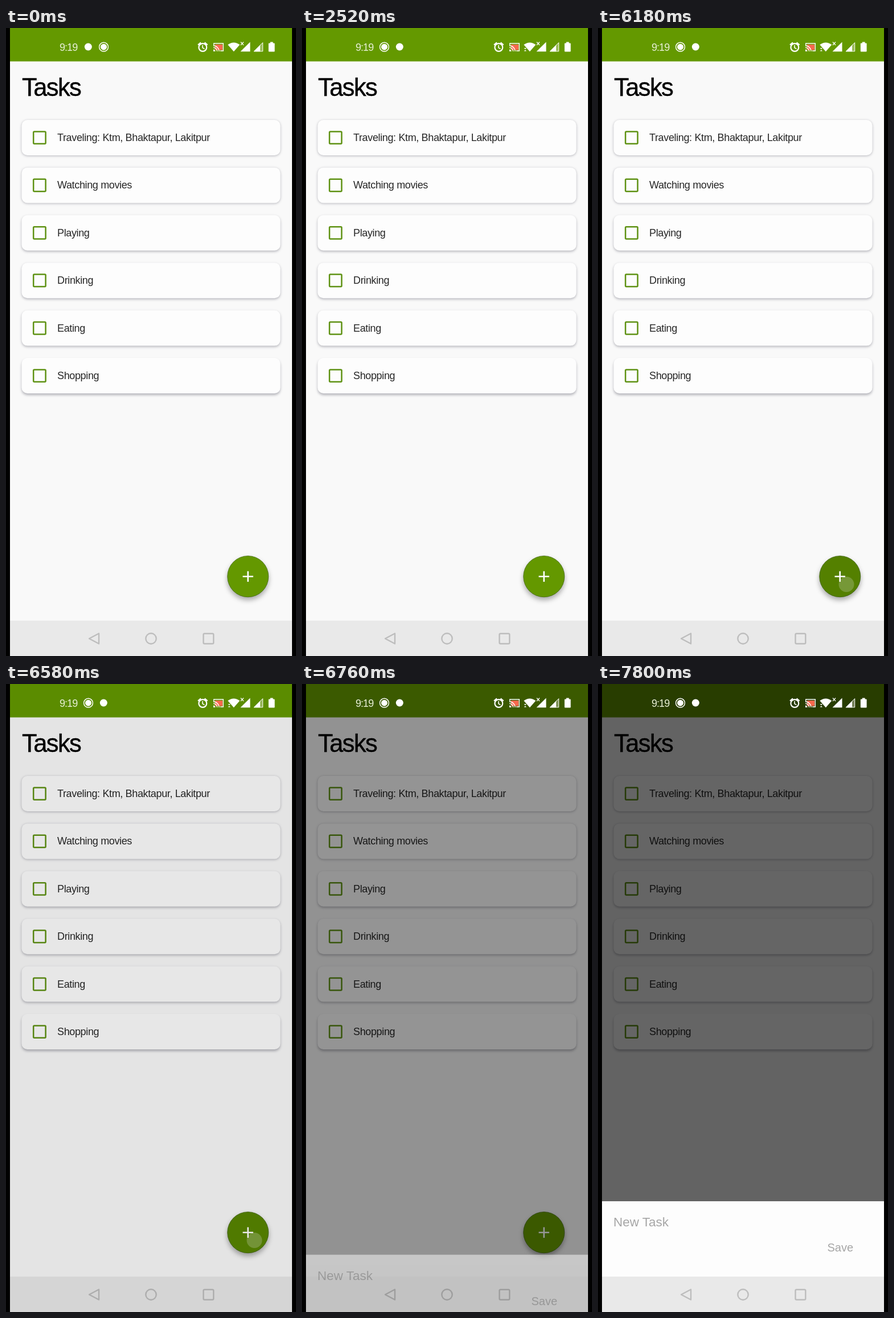
These frames come from a looping animation (509 px wide and 1100 px high, 8000 ms). An HTML page:

```html
<!DOCTYPE html>
<html lang="en">
<head>
<meta charset="utf-8">
<title>Tasks</title>
<style>
  html, body { margin: 0; width: 100%; height: 100%; overflow: hidden; background: #000; }
  svg { display: block; width: 100%; height: 100%; font-family: "Liberation Sans", Arial, sans-serif; }
  .title { font-size: 43.5px; letter-spacing: -1.6px; stroke: #000; stroke-width: .4; }
  .label { font-size: 18px; letter-spacing: -.36px; fill: #262626; }
  .card { fill: #fdfdfd; }
  .box { fill: none; stroke: #5f9214; stroke-width: 2.5; }
  .fab { fill: #649800; stroke: #41690c; stroke-width: .8; filter: drop-shadow(.5px 5px 4px rgba(0, 0, 0, .32)); }
  .hint { fill: #a6a6a6; }
  .nav { fill: none; stroke: #000; stroke-opacity: .19; stroke-width: 2.4; stroke-linejoin: round; }
</style>
</head>
<body>
<svg viewBox="0 0 509 1100" xmlns="http://www.w3.org/2000/svg">
  <defs><clipPath id="screen"><rect x="7" width="495" height="1100"/></clipPath></defs>
  <rect width="509" height="1100"/>
  <g clip-path="url(#screen)">
    <rect x="7" width="495" height="1100" fill="#f9f9f9"/>
    <rect x="7" width="495" height="58.5" fill="#649900"/>
    <text class="title" x="28" y="118.5">Tasks</text>
    <g id="list"></g>
    <rect x="7" y="1038" width="495" height="62" fill="#e9e9e9"/>

    <circle class="fab" cx="424.7" cy="960.7" r="36"/>
    <circle id="ripple" cx="424.7" cy="960.7" r="36" opacity="0"/>
    <path d="M415.5 960.7h18.4M424.7 951.5v18.4" stroke="#fff" stroke-width="2.6"/>

    <rect id="scrim" x="7" width="495" height="1100" opacity="0"/>

    <g id="sheet" opacity="0">
      <rect x="7" y="906" width="495" height="132" fill="#fdfdfd"/>
      <rect x="7" y="1038" width="495" height="62" fill="#e9e9e9"/>
      <text class="hint" x="27" y="950" font-size="22.5">New Task</text>
      <text class="hint" x="402.5" y="994" font-size="20">Save</text>
    </g>

    <g class="nav">
      <path d="M146 1069.5L163 1060.5V1078.5Z"/>
      <circle cx="254.5" cy="1069.5" r="9.2"/>
      <rect x="346.5" y="1060.7" width="17.8" height="17.8" rx="2"/>
    </g>

    <g fill="#fff">
      <text x="94" y="39.5" font-size="18" letter-spacing="-.95" fill="#e9f0d8">9:19</text>
      <circle id="notice" cy="33" r="6.5"/>
      <g id="record">
        <circle cy="33.2" r="7.9" fill="none" stroke="#fff" stroke-width="1.5"/>
        <circle cy="33.2" r="5.5"/>
      </g>

      <g fill="none" stroke="#fff">
        <circle cx="345.3" cy="34" r="6.9" stroke-width="2.2"/>
        <path d="M337 29.6L342 25.3M353.6 29.6L348.6 25.3" stroke-width="2.2"/>
        <path d="M345 30V34.5L348.4 36.6" stroke-width="1.6"/>
      </g>

      <rect x="367" y="29" width="13" height="9.5" fill="#f8694e"/>
      <path d="M364 37.5V41H367.5A3.5 3.5 0 0 0 364 37.5Z"/>
      <path d="M364.7 30.5V27H381.3V40H376M364 34.3A6.7 6.7 0 0 1 370.7 41M364 31A10 10 0 0 1 374 41"
        fill="none" stroke="#fff" stroke-width="1.4"/>

      <path d="M389.3 29.3Q399.7 21.6 410.3 29.3L399.8 41.3Z"/>
      <path id="activity" d="M389.6 35h4.4l-2.2 2.3zM389.6 40.6h4.4l-2.2-2.3z" visibility="hidden"/>
      <path d="M412 24.5l5 5.5m0-5.5l-5 5.5" stroke="#fff" stroke-width="1.2"/>
      <path d="M411.5 41.3L428.5 24.5V41.3Z"/>
      <path d="M435.5 40.8L450.7 25.6V40.8Z" fill-opacity=".35" stroke="#fff"/>
      <path d="M434.5 41.3L446 29.8V41.3Z"/>
      <path d="M463.8 24.5h4.8v2h2q1 0 1 1v13q0 1-1 1h-8.8q-1 0-1-1v-13q0-1 1-1h2z"/>
    </g>

    <circle id="touch" cx="436" cy="974.5" r="13.5" fill="#e6e6e6" opacity="0"/>
  </g>
</svg>
<script>
const LOOP = 8000;
const $ = id => document.getElementById(id);
const set = (id, attrs) => {
  for (const name in attrs) $(id).setAttribute(name, attrs[name]);
};

const tasks = ["Traveling: Ktm, Bhaktapur, Lakitpur", "Watching movies", "Playing",
  "Drinking", "Eating", "Shopping"];
// Shadows fall further the lower a card sits below the overhead light.
$("list").innerHTML = tasks.map((task, i) => {
  const y = 161 + i * 83.4;
  const shadow = `drop-shadow(0 ${1.5 + i * .3}px 2px rgba(40, 40, 60, .32))`;
  return `<rect class="card" style="filter: ${shadow}" x="27.5" y="${y}" width="454" height="62" rx="10"/>
    <rect class="box" x="48.2" y="${y + 20.4}" width="21.4" height="21.4" rx="1.5"/>
    <text class="label" x="90" y="${y + 37}">${task}</text>`;
}).join("");

const progress = (t, from, to) => Math.min(1, Math.max(0, (t - from) / (to - from)));
const smooth = p => p * p * (3 - 2 * p);
const decelerate = p => 1 - (1 - p) ** 2;

function draw(t) {
  // Notification icons trade places.
  const swap = 27 * smooth(progress(t, 540, 1340));
  set("notice", { transform: `translate(${144.3 + swap} 0)` });
  set("record", { transform: `translate(${171.5 - swap} 0)` });
  set("activity", { visibility: t >= 1900 ? "visible" : "hidden" });

  // Press on the add button.
  const release = 1 - progress(t, 6540, 6700);
  set("ripple", { opacity: .17 * progress(t, 5980, 6200) * release });
  set("touch", { opacity: t < 6000 ? 0 : .24 * (1 - progress(t, 6580, 6680)) });

  // Dimming and the sheet rising.
  set("scrim", { opacity: .6 * decelerate(progress(t, 6545, 7030)) });
  const rise = decelerate(progress(t, 6598, 7067));
  set("sheet", {
    transform: `translate(0 ${220 * (1 - rise)})`,
    opacity: progress(t, 6605, 6924)
  });
}

const start = performance.now();
function tick() {
  draw((performance.now() - start) % LOOP);
  requestAnimationFrame(tick);
}
tick();
</script>
</body>
</html>
```
